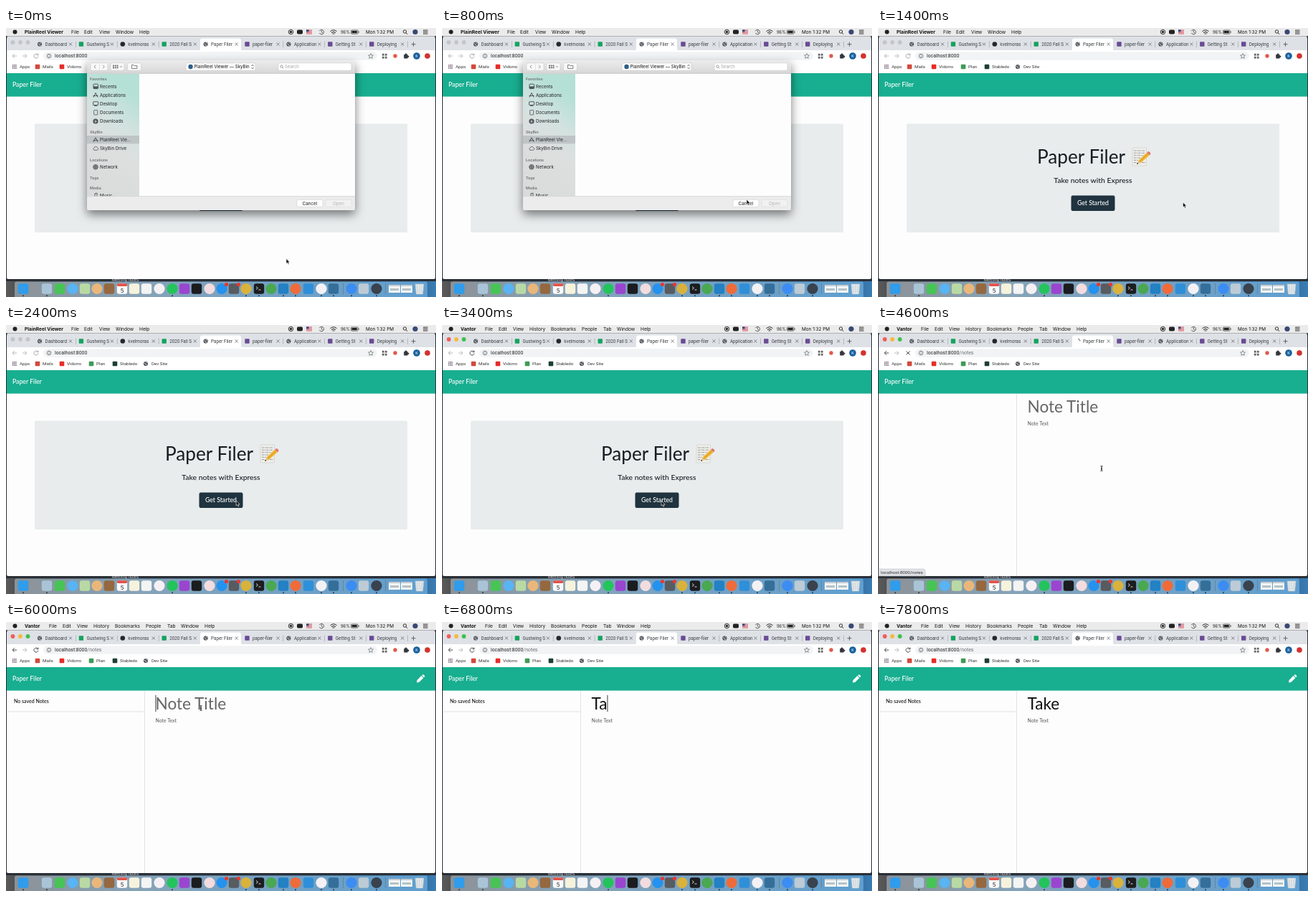
An HTML page for the animation above (8 s loop, 600 by 375 pixels).

```html
<!DOCTYPE html>
<html lang="en">
<head>
<meta charset="utf-8">
<title>Paper Filer</title>
<style>
html, body { margin: 0; width: 100%; height: 100%; overflow: hidden; background: #26303c; }
svg { display: block; }
#stage { width: 100%; height: 100%; }
text { white-space: pre; }
.ui { font-family: Inter, sans-serif; }
.web { font-family: Roboto, sans-serif; }
.page, .label { font-family: Lato, sans-serif; }
.label { font-weight: 500; }
</style>
</head>
<body>
<svg id="stage" viewBox="0 0 600 375" preserveAspectRatio="none">
  <defs>
    <linearGradient id="desk"><stop stop-color="#5b5a5a"/><stop offset=".1" stop-color="#2a323c"/><stop offset=".9" stop-color="#2d4f70"/><stop offset="1" stop-color="#3a7db5"/></linearGradient>
    <linearGradient id="dockFill"><stop stop-color="#8a9299"/><stop offset=".3" stop-color="#86a3b8"/><stop offset="1" stop-color="#5f9fd0"/></linearGradient>
    <linearGradient id="sideFill" x1=".3" x2="0" y2="1"><stop stop-color="#b5e0d6"/><stop offset=".28" stop-color="#d3e2df"/><stop offset=".5" stop-color="#dddfdf"/><stop offset="1" stop-color="#d9dbdb"/></linearGradient>
    <linearGradient id="barFill" x2="0" y2="1"><stop stop-color="#ececec"/><stop offset="1" stop-color="#d6d6d6"/></linearGradient>
    <filter id="shadow" x="-10%" y="-10%" width="120%" height="130%"><feDropShadow dx="0" dy="6" stdDeviation="7" flood-opacity=".5"/></filter>
  </defs>
</svg>
<script>
const LOOP = 8000, STEP = 200;
const CLOSE = 1200, FOCUS = 2600, HOVER = 3600, NAVIGATE = 4200, LOADED = 5000, CLICK = 5800, TYPE = 6600;
const stage = document.getElementById('stage');

// Markup helpers
const rect = (x, y, w, h, fill, r = 0, more = '') =>
  `<rect x="${x}" y="${y}" width="${w}" height="${h}" rx="${r}" fill="${fill}" ${more}/>`;
const disc = (x, y, r, fill, more = '') => `<circle cx="${x}" cy="${y}" r="${r}" fill="${fill}" ${more}/>`;
const line = (d, color = '#555', w = 1, more = '') =>
  `<path d="${d}" fill="none" stroke="${color}" stroke-width="${w}" ${more}/>`;
const text = (font, x, y, size, str, fill = '#333', more = '') =>
  `<text class="${font}" x="${x}" y="${y}" font-size="${size}" fill="${fill}" ${more}>${str}</text>`;
const group = (id, content, more = '') => `<g id="${id}" ${more}>${content}</g>`;
const MIDDLE = 'text-anchor="middle"';
const BOLD = 'font-weight="600"';

const globe = (x, y) => disc(x, y, 3.1, '#50555b') +
  line(`M${x - 2.2} ${y - .8}q2 .3 2 1.6t1.8 1M${x + .6} ${y - 2.2}l1.4 1.6`, '#dfe2e6', .9);

function menu(id, app, entries) {
  return group(id, text('ui', 26, 8, 6.6, app, '#111', 'font-weight="700"') +
    entries.map(([x, label]) => text('ui', x, 8, 6.6, label, '#111')).join(''));
}

function menuBar() {
  const flag = rect(419, 2.5, 8, 6, '#fff') + [2.5, 4.2, 5.9, 7.6].map(y => rect(419, y, 8, .9, '#c9414b')).join('') +
    rect(419, 2.5, 3.6, 3, '#36487f');
  return rect(0, 0, 600, 11, '#ebebec') + disc(12.5, 5.5, 3, '#222') +
    menu('menuPlayer', 'PlainReel Viewer', [[91, 'File'], [109, 'Edit'], [130, 'View'], [153, 'Window'], [186, 'Help']]) +
    menu('menuBrowser', 'Vantor', [[60, 'File'], [79, 'Edit'], [99, 'View'], [122, 'History'], [152, 'Bookmarks'],
      [195, 'People'], [225, 'Tab'], [244, 'Window'], [277, 'Help']]) +
    disc(397.5, 5.5, 3.2, 'none', 'stroke="#222"') + disc(397.5, 5.5, 1.7, '#222') + rect(406, 2.4, 8, 6.2, '#222', 1.8) + flag +
    line('M437.4 4.2a3.2 3.2 0 1 1 0 2.8M440.3 3.4v2.4l1.6 1', '#333', .8) +
    line('M452.5 4.8q4.5-4 9 0M454 6.6q3-2.6 6 0M455.6 8.2q1.4-1 2.8 0', '#222', 1) +
    text('ui', 467, 7.8, 5.8, '96%', '#222') +
    rect(481.5, 3, 9.5, 5.2, 'none', 1, 'stroke="#333" stroke-width=".7"') + rect(482.5, 4, 7.2, 3.2, '#222') + rect(491.7, 4.6, .9, 2, '#333') +
    text('ui', 502, 8, 6.4, 'Mon 1:32 PM', '#111') +
    disc(556.5, 5, 2.2, 'none', 'stroke="#222" stroke-width=".9"') + line('M558 6.6l2.2 2.2', '#222', 1) +
    disc(571, 5.5, 3.6, '#394874') +
    line('M582 3.2h6.5M582 5.6h6.5M582 8h6.5', '#222', 1);
}

function tabStrip() {
  const titles = ['Dashboard', 'Gustwing S', 'kvelmoras', '2020 Fall S', 'Paper Filer', 'paper-filer', 'Application', 'Getting St', 'Deploying'];
  const colors = { 1: '#16a360', 2: '#24292e', 3: '#16a360', 5: '#6a4a94', 7: '#6a4a94', 8: '#6a4a94' };
  const tabs = titles.map((title, i) => {
    const x = 47 + i * 57.9;
    const icon = i === 2 ? disc(x, 22.5, 3.3, colors[i]) :
      colors[i] ? rect(x - 3.2, 19.3, 6.4, 6.4, colors[i], .8) : globe(x, 22.5);
    return (i === 4 ? group('tabIcon', icon) : icon) +
      `<svg x="${x + 7.5}" y="14" width="32" height="17">${text('web', 0, 10.8, 6.3, title, '#3c4043')}</svg>` +
      line(`M${x + 41} 20.5l4 4m0-4l-4 4`, '#5f6368', .8) +
      (i < 3 || i > 4 ? rect(x + 50, 18.5, .6, 8.5, '#9a9fa5') : '');
  }).join('');
  const lights = colors => colors.map((c, i) => disc(9.5 + i * 10.5, 20, 2.9, c)).join('');
  return rect(1, 11, 598, 2, '#aeb0b3', 2) + rect(1, 12, 598, 22, '#dee1e6', 3) +
    group('lightsOff', lights(['#c3c5c9', '#c3c5c9', '#c3c5c9'])) + group('lightsOn', lights(['#ee5f57', '#f4b940', '#3fc04c'])) +
    '<path d="M268 31.5q3 0 3-3v-11q0-3 3-3h51q3 0 3 3v11q0 3 3 3z" fill="#fff"/>' + tabs +
    group('spinner', line('M279 19.5a3 3 0 0 1 3 3', '#5f6368', 1)) +
    line('M568.5 19.7v6M565.5 22.7h6', '#5f6368', 1);
}

function toolbar() {
  const back = color => line('M15 39h-6m2.8-2.8l-2.8 2.8 2.8 2.8', color, 1);
  const reload = color => line('M44.3 37.2a3 3 0 1 0 .6 2.6m.1-4.2v2.2h-2.3', color, 1);
  const qr = [[0, 0], [4, 0], [0, 4], [4, 4]].map(([x, y]) => rect(524.8 + x, 35.8 + y, 2.8, 2.8, '#666')).join('');
  const marks = [['Mails', 44, '#d5483d'], ['Vidorro', 78, '#e52d27'], ['Plan', 119, '#3f9b58'], ['Stabledo', 152, '#1f3f33']];
  return rect(1, 31, 598, 32, '#fff') + rect(52, 33.3, 466, 11.4, '#f1f3f4', 5.7) +
    group('navOff', back('#b5b8bc')) + group('navOn', back('#4a4d51')) +
    line('M23 39h6m-2.8-2.8l2.8 2.8-2.8 2.8', '#b9bcbf', 1) +
    group('reloadOff', reload('#a5a8ac')) + group('reloadOn', reload('#4a4d51')) +
    group('stop', line('M39.5 36.5l5 5m0-5l-5 5', '#4a4d51', 1)) +
    disc(60, 39, 2.8, 'none', 'stroke="#5f6368" stroke-width=".8"') + rect(59.6, 38.6, .8, 2, '#5f6368') + rect(59.6, 37.2, .8, .8, '#5f6368') +
    text('web', 68, 41.4, 6.9, 'localhost:8000<tspan id="urlPath" fill="#6d7175">/notes</tspan>', '#222') +
    line('M509 35.6l1 2.3 2.5.2-1.9 1.7.6 2.5-2.2-1.3-2.2 1.3.6-2.5-1.9-1.7 2.5-.2z', '#5f6368', .7) +
    qr + disc(543, 39, 2.7, '#e2584b') +
    rect(555.2, 37, 5.4, 5.4, '#34373b', .6) + disc(558, 36.8, 1.4, '#34373b') + disc(561, 39.8, 1.4, '#34373b') +
    disc(573, 39, 4.8, '#17609d') + text('web', 573, 41, 5.5, 'K', '#fff', MIDDLE) + disc(588, 39, 3.8, '#d3322e') +
    [0, 1, 2].map(i => [0, 1, 2].map(j => rect(8.8 + i * 2.2, 51 + j * 2.2, 1.5, 1.5, ['#d25a4f', '#5f6368', '#4285c4'][(i + j) % 3])).join('')).join('') +
    text('web', 19, 56.2, 6.2, 'Apps') +
    marks.map(([label, x, color]) => rect(x - 3.3, 50.8, 6.6, 6.4, color, 1) + text('web', x + 7, 56.2, 6.2, label)).join('') +
    globe(195, 54) + text('web', 203, 56.2, 6.2, 'Dev Site');
}

function homePage() {
  const memo = rect(355, 167, 19.5, 25, '#eeeeea', 1, 'stroke="#c9cac5" stroke-width=".6"') +
    line('M357 171h15M357 174.3h15M357 177.6h13M357 181h10M357 184.3h6M357 187.6h4M368 187.6h5', '#989b98', 1, 'stroke-dasharray="3 .8 1.5 .7"') +
    '<path d="M361.5 189.5l2-5 11.8-11 3.6 3.8-12.2 10.7z" fill="#f2b632"/>' +
    '<path d="M375.3 173.5l1.7-1.5q3.2.4 3.5 3.8l-1.6 1.5z" fill="#e2727c"/>' +
    '<path d="M361.5 189.5l2-5 3.2 3.5z" fill="#e5c59a"/>' + disc(362.1, 188.9, .9, '#333') + line('M365 186.2l12-11.1', '#d18c1f', .9);
  return group('home', rect(40, 133.5, 520, 151.5, '#e8eced', 1.5) +
    text('page', 222, 189, 26.2, 'Paper Filer', '#181d22') + memo +
    text('label', 300, 216, 10.4, 'Take notes with Express', '#181d22', MIDDLE) +
    rect(269.5, 233.5, 61, 21.5, '#20333f', 2.2) + text('label', 300, 247.3, 8.7, 'Get Started', '#fff', MIDDLE));
}

function notesPage() {
  return group('notes', rect(193, 96, .8, 254, '#dcdddd') +
    text('page', 208.5, 122, 22.6, '', '#666', 'id="noteTitle"') + text('label', 208.5, 140, 6.9, 'Note Text', '#666') +
    rect(0, 102, .9, 23, '#222', 0, 'id="caret"') +
    group('loaded', text('label', 11, 112.8, 7, 'No saved Notes', '#111') + rect(2, 124.6, 191, .8, '#d9dada') +
      '<path d="M573 84.5l.6-3.4 6-6 2.8 2.8-6 6zM580.3 74.4l1-1q.7-.5 1.4 0l1.4 1.4q.5.7 0 1.4l-1 1z" fill="#fff"/>'));
}

function dock() {
  const icons = [[24, '#2f9cec'], [40, '#8d949b', 1], [57, '#a9c4d6'], [75, '#47c455'], [93, '#58b4f2', 1], [110, '#b9d9a4'],
    [127, '#e9b77a', 1], [144, '#95683f'], [162, '#fafafa'], [179, '#f6f2dc'], [196, '#f4f4f4'], [214, '#f5f0f4', 1],
    [232, '#23c45c', 1], [249, '#9a45cf'], [266, '#1b1c1f'], [284, '#f2dcdf', 1], [301, '#2492ee', 1], [318, '#585b60'],
    [335, '#d9b23b', 1], [353, '#1c1d1f'], [370, '#49a851', 1], [387, '#2381c4'], [404, '#f06b3a', 1], [422, '#2f8fd9'],
    [440, '#f4f1f4', 1], [457, '#356f99'], [482, '#3c8cf2', 1], [499, '#bccbd5'], [517, '#3a424d', 1]];
  const running = [24, 57, 232, 335, 353, 387, 404, 440, 457, 482, 517];
  return rect(12, 353.5, 576, 24, 'url(#dockFill)', 3) +
    icons.map(([x, color, round]) => round ? disc(x, 363.5, 7.6, color) : rect(x - 7.2, 356.3, 14.4, 14.4, color, 3)).join('') +
    rect(155, 356.3, 14, 3.6, '#e35148', 1.5) + text('ui', 162, 368.5, 8, '5', '#333', MIDDLE) +
    disc(307.5, 357.5, 2.6, '#e8382f') + disc(324.5, 357.5, 2.6, '#e8382f') +
    line('M349 360.5l2.5 2-2.5 2M352.5 365h3', '#eee', .9) +
    [470, 529].map(x => rect(x, 356, .7, 15, '#65798a')).join('') +
    [534, 551].map(x => rect(x, 358, 16, 11, '#f3f5f5') + rect(x, 358, 16, 2, '#c7cdd2') + rect(x + 2, 363, 12, 3, '#b6c3c8')).join('') +
    '<path d="M571 357h12l-1.4 14h-9.2z" fill="#e3e8eb" stroke="#b4c0c8" stroke-width=".7"/>' + line('M573.5 359l1 10M577 359v10M580.5 359l-1 10', '#bcc6cc', .7) +
    running.map(x => disc(x, 373.2, .9, '#222')).join('');
}

function dialog() {
  const button = (x, w, fill = '#f8f8f8') => rect(x, 48.7, w, 10.6, fill, 2, 'stroke="#c2c2c2" stroke-width=".5"');
  const heads = [['Favorites', 73], ['SkyBin', 147.3], ['Locations', 185.5], ['Tags', 211], ['Media', 225]];
  const items = [['Recents', 83.6], ['Applications', 95.7], ['Desktop', 107.8], ['Documents', 120], ['Downloads', 132.2],
    ['PlainReel Vie…', 158], ['SkyBin Drive', 170.2], ['Network', 196], ['Music', 235.5]];
  const ink = '#4d5357';
  const icon = (i, y) => [
    rect(122, y - 3.2, 6.5, 6.4, 'none', 1, `stroke="${ink}"`) + rect(122, y, 6.5, 3, ink),
    line(`M122 ${y + 3}l3-6 3.2 6M121.5 ${y + 1}h7`, ink),
    rect(121.6, y - 2.8, 7, 4.6, 'none', .5, `stroke="${ink}"`) + rect(123, y + 2.5, 4.2, .9, ink),
    rect(122.7, y - 3.2, 5, 6.4, 'none', .5, `stroke="${ink}" stroke-width=".8"`),
    disc(125, y, 3.6, ink) + line(`M125 ${y - 2}v3.5m-1.6-1.5l1.6 1.6 1.6-1.6`, '#eee', .8),
    line(`M122 ${y + 3}l3-6 3.2 6M121.5 ${y + 1}h7`, ink),
    line(`M122.8 ${y + 2.2}a1.8 1.8 0 0 1 .2-3.2a2.4 2.4 0 0 1 4.5 0a1.7 1.7 0 0 1 .3 3.2z`, ink, .8),
    disc(125, y, 3.3, '#8a9195', `stroke="${ink}" stroke-width=".8"`) + line(`M121.8 ${y}h6.4M125 ${y - 3.2}v6.4`, ink, .6),
    line(`M124 ${y + 2.5}v-5l3-.6v5`, ink, .9)][i];
  const sidebar = rect(113, 64, 73, 170.5, 'url(#sideFill)') + rect(113, 150, 73, 11.2, '#bfc4c5') +
    heads.map(([label, y]) => text('ui', 117, y, 5.3, label, '#6a7173', BOLD)).join('') +
    items.map(([label, y], i) => icon(i, y - 2.2) + text('ui', 131, y, 6.2, label, '#1c2022')).join('');
  return group('dialog',
    rect(113, 45, 374, 209, '#ececec', 3, 'filter="url(#shadow)"') + rect(113, 45, 374, 19, 'url(#barFill)', 3) +
    rect(113, 62, 374, 2, '#d2d2d2') + rect(186, 64, 301, 170.5, '#fdfdfd') +
    `<svg x="113" y="64" width="73" height="170.5" viewBox="113 64 73 170.5">${sidebar}</svg>` +
    rect(113, 234.5, 374, .6, '#c9c9c9') +
    button(118, 24) + rect(130, 49, .5, 10, '#ccc') + line('M125.3 51.7l-2.3 2.3 2.3 2.3M135 51.7l2.3 2.3-2.3 2.3', '#777', .8) +
    button(146, 19) + [0, 1, 2].map(i => [0, 1].map(j => rect(149 + i * 2.8, 51.6 + j * 2.8, 1.9, 1.9, '#666')).join('')).join('') + line('M159 53.2l1.4 1.4 1.4-1.4', '#666', .8) +
    button(169.5, 19) + line('M175.5 56.5v-5h2.5l.8 1h4v4z', '#666', .8) +
    button(251, 97, '#fbfbfb') + disc(257.5, 54, 3.2, '#2e5d88') +
    text('ui', 301, 56.2, 6.1, 'PlainReel Viewer — SkyBin', '#111', MIDDLE) + line('M342.5 53l1.6-1.7 1.6 1.7M342.5 55l1.6 1.7 1.6-1.7', '#444', .8) +
    button(380, 102, '#fff') + disc(384.5, 53.6, 1.7, 'none', 'stroke="#777" stroke-width=".7"') + line('M385.8 55l1.5 1.5', '#777', .7) +
    text('ui', 389, 56.2, 6, 'Search', '#a2a2a2') +
    rect(406, 239.3, 36, 10, '#fff', 2, 'stroke="#c4c4c4" stroke-width=".5"') + text('ui', 424, 246.5, 6.2, 'Cancel', '#111', MIDDLE) +
    rect(446, 239.3, 36, 10, '#f1f1f1', 2, 'stroke="#d6d6d6" stroke-width=".5"') + text('ui', 464, 246.5, 6.2, 'Open', '#b3b3b3', MIDDLE));
}

stage.insertAdjacentHTML('beforeend',
  rect(0, 0, 600, 375, '#2a2f36') + rect(0, 353, 600, 22, 'url(#desk)') + text('ui', 148, 353, 5.5, 'Meeting notes', '#e4e7ea') +
  rect(1, 60, 598, 290, '#fdfdfd', 2) + menuBar() + tabStrip() + toolbar() +
  rect(1, 63, 598, 32.6, '#18ae90') + text('label', 9, 82.2, 8.7, 'Paper Filer', '#fff') +
  homePage() + notesPage() +
  group('status', '<path d="M1 340h62q3 0 3 3v7h-65z" fill="#dee1e6" stroke="#b9bdc2" stroke-width=".5"/>' +
    text('web', 4, 347.2, 6.2, 'localhost:8000/notes', '#333')) +
  dock() + dialog() +
  group('arrow', '<path d="M0 0v7l1.6-1.4 1.2 2.6 1.2-.6-1.1-2.4h2.2z" fill="#111" stroke="#fff" stroke-width=".6"/>') +
  group('beam', line('M-1.6-3.6q1.6 0 1.6 1v5.2q0 1-1.6 1M1.6-3.6q-1.6 0-1.6 1v5.2q0 1 1.6 1M-1 .9h2', '#222', .8)));

const el = id => document.getElementById(id);
const show = (id, on) => { el(id).style.display = on ? '' : 'none'; };

// Pointer stops: time, x, y
const stops = [[0, 391, 321.5], [700, 425, 239], [1000, 425, 239], [1400, 425.5, 243], [1700, 425.5, 243], [2600, 306, 245],
  [4200, 306, 245], [4600, 312, 200], [5000, 312, 200], [5600, 272, 120], [LOOP, 272, 120]];

function pointer(t) {
  const i = stops.findIndex(s => s[0] > t);
  const [t0, x0, y0] = stops[i - 1], [t1, x1, y1] = stops[i];
  const u = (t - t0) / (t1 - t0), e = u * u * (3 - 2 * u);
  return `translate(${x0 + (x1 - x0) * e} ${y0 + (y1 - y0) * e})`;
}

function draw(t) {
  const focused = t >= FOCUS, notes = t >= NAVIGATE, loading = notes && t < LOADED;
  show('dialog', t < CLOSE);
  show('menuPlayer', !focused);
  show('menuBrowser', focused);
  show('lightsOff', !focused);
  show('lightsOn', focused);
  show('home', !notes);
  show('notes', notes);
  show('urlPath', notes);
  show('navOff', !notes);
  show('navOn', notes);
  show('reloadOff', !focused);
  show('reloadOn', focused && !loading);
  show('stop', loading);
  show('tabIcon', !loading);
  show('spinner', loading);
  el('spinner').setAttribute('transform', `rotate(${(t - 4600) * .45} 279 22.5)`);
  show('status', t >= HOVER && t < LOADED);
  show('loaded', t >= LOADED);

  const count = Math.max(0, Math.min(4, Math.floor((t - TYPE) / STEP) + 1));
  const title = el('noteTitle');
  title.textContent = count ? 'Take'.slice(0, count) : 'Note Title';
  title.setAttribute('fill', count ? '#111' : '#666');
  const lastInput = count ? TYPE + (count - 1) * STEP : CLICK;
  show('caret', t >= CLICK && (t - lastInput) % 1000 < 500);
  el('caret').setAttribute('x', 208.5 + (count ? title.getComputedTextLength() : 0));

  const beam = t > NAVIGATE;
  show('arrow', !beam);
  show('beam', beam && t < TYPE);
  el(beam ? 'beam' : 'arrow').setAttribute('transform', pointer(t));
}

const start = performance.now();
function tick() {
  const t = (performance.now() - start) % LOOP;
  draw(Math.floor(t / STEP) * STEP);
  requestAnimationFrame(tick);
}
tick();
</script>
</body>
</html>
```
